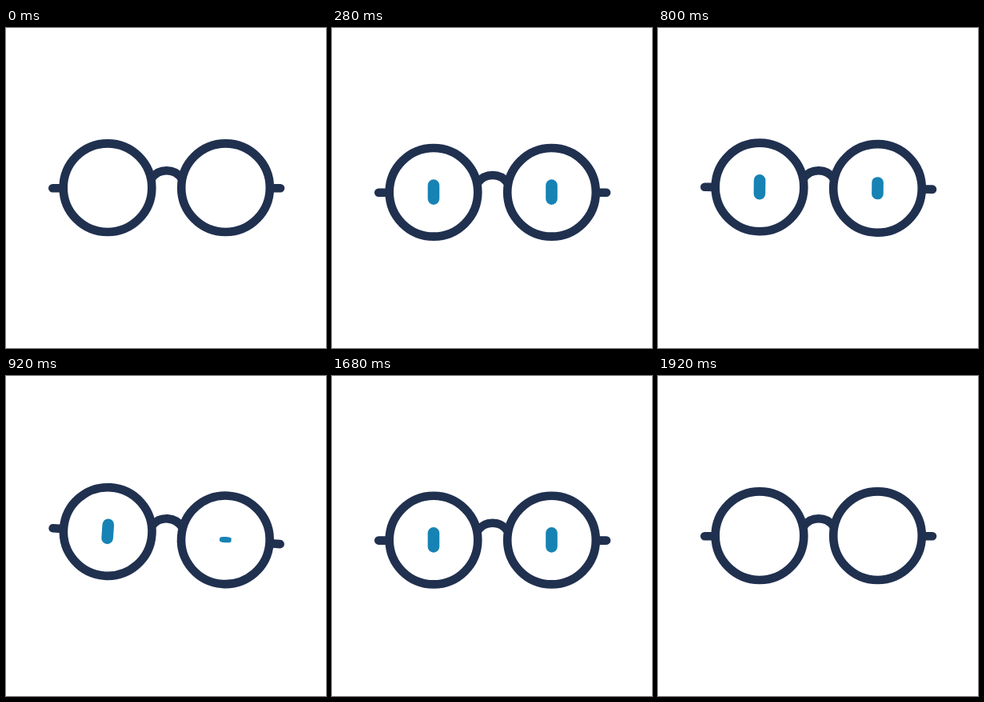
These frames come from a looping animation (400 by 400 pixels, 2 s). An HTML page:

```html
<!DOCTYPE html>
<html lang="en">
<head>
<meta charset="utf-8">
<title>Winking glasses</title>
<style>
  html, body { margin: 0; width: 100%; height: 100%; overflow: hidden; background: #fff; }
  svg { display: block; width: 100%; height: 100%; }
</style>
</head>
<body>
<svg viewBox="0 0 400 400">
  <g id="glasses" fill="none" stroke-linecap="round">
    <g stroke="#20304f" stroke-width="10.6">
      <circle cx="127" cy="199.7" r="55.3"/>
      <circle cx="274.5" cy="199.7" r="55.3"/>
      <path d="M182 188A23 23 0 0 1 219.5 188M58.3 200.2H70M343 200.2H331.5"/>
    </g>
    <g stroke="#1683b4" stroke-width="14.6">
      <path id="left" d="M0 -8.5V8.5"/>
      <path id="right" d="M0 -8.5V8.5"/>
    </g>
  </g>
</svg>
<script>
  const LOOP = 2000, STEP = 40;
  const $ = id => document.getElementById(id);
  const glasses = $('glasses'), left = $('left'), right = $('right');

  // Eased 0 to 1 between two times.
  function ramp(t, from, to) {
    const p = Math.min(1, Math.max(0, (t - from) / (to - from)));
    return (1 - Math.cos(Math.PI * p)) / 2;
  }

  // Rises to 1 at the peak and falls back to 0.
  const pulse = (t, from, peak, to) => ramp(t, from, peak) - ramp(t, peak, to);

  function setPupil(node, x, scale) {
    node.setAttribute('visibility', scale > 0.01 ? 'visible' : 'hidden');
    node.setAttribute('transform', `translate(${x} 199.5) scale(1 ${scale})`);
  }

  function draw(t) {
    const hop = 8 * pulse(t, 160, 310, 440) - 17 * pulse(t, 0, 160, 310);
    const exit = 8 * pulse(t, 1640, 1705, 1840) - 4 * pulse(t, 1705, 1840, 1920);
    const wink = ramp(t, 760, 920) - ramp(t, 1080, 1240);
    const open = ramp(t, 80, 240) - ramp(t, 1700, 1860);

    glasses.setAttribute('transform',
      `translate(0 ${hop + exit}) rotate(${4 * wink} 200.75 199.7)`);
    setPupil(left, 127, open);
    setPupil(right, 274.5, open * (1 - 0.77 * wink));
  }

  const start = performance.now();
  function tick() {
    const t = (performance.now() - start) % LOOP;
    draw(Math.floor(t / STEP) * STEP);
    requestAnimationFrame(tick);
  }
  draw(0);
  requestAnimationFrame(tick);
</script>
</body>
</html>
```
